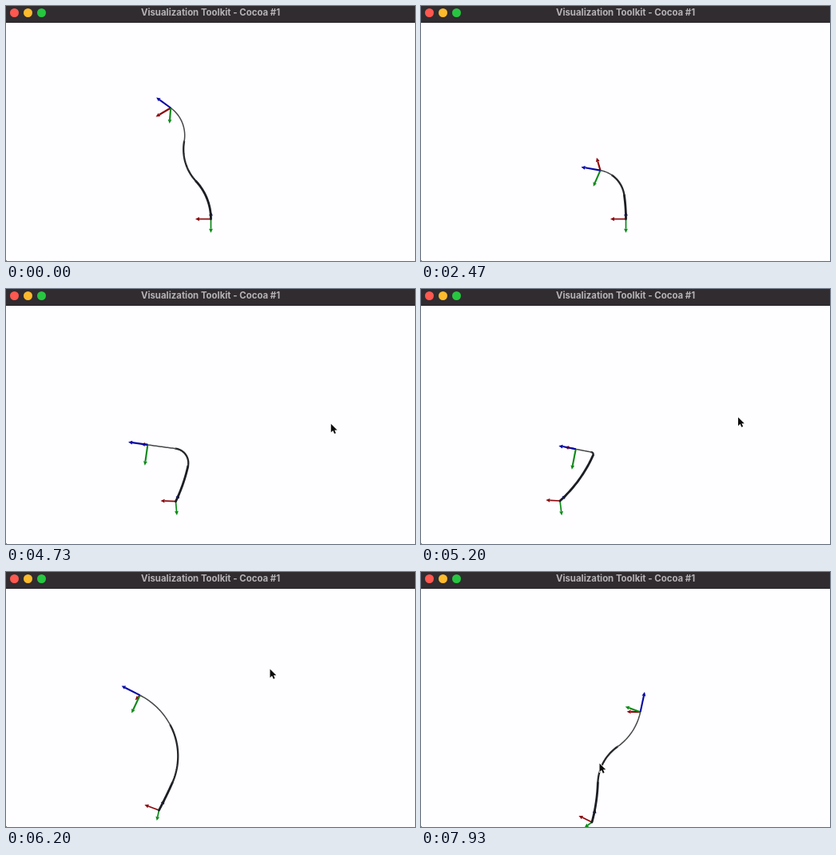
An HTML page with a canvas that plays this animation: 512x319 px, repeating every 8 s.

```html
<!DOCTYPE html>
<html lang="en">
<head>
<meta charset="utf-8">
<title>Arm viewer</title>
<style>
  html, body { margin: 0; width: 100%; height: 100%; overflow: hidden; background: #fefdff; }
  #stage { position: relative; width: 512px; height: 319px; overflow: hidden; }
  canvas { position: absolute; left: 0; top: 0; width: 512px; height: 319px; }
  header {
    position: absolute; left: 0; top: 0; width: 512px; height: 21px; box-sizing: border-box;
    background: #302c30; border-bottom: 1px solid #262326;
    font: 700 11.4px/17px Inter, "Liberation Sans", sans-serif;
    color: #b6b3b6; text-align: center; white-space: nowrap;
  }
  header i { position: absolute; top: 3px; width: 11px; height: 11px; border-radius: 50%; }
</style>
</head>
<body>
<div id="stage">
  <canvas id="view"></canvas>
  <header>
    <i style="left:5px;background:#fe5850"></i>
    <i style="left:22px;background:#fdba2d"></i>
    <i style="left:39px;background:#27c640"></i>
    Visualization Toolkit - Cocoa #1
  </header>
</div>
<script>
const LOOP = 8000, RATE = 15;
const RED = '#8b080c', GREEN = '#0b8a18', BLUE = '#0608a4';
const SECTIONS = [
  { width: 2.8, color: '#1b1e23' },
  { width: 2.3, color: '#24272a' },
  { width: 1.5, color: '#454748' }
];

const canvas = document.getElementById('view');
const ctx = canvas.getContext('2d');
const dpr = window.devicePixelRatio || 1;
canvas.width = 512 * dpr;
canvas.height = 319 * dpr;
ctx.scale(dpr, dpr);

// Each arm is three constant-curvature arcs (end heading, length), then the tip's tilt and roll.
// Angles are in degrees, clockwise from screen right.
const bent = [270, 19, 183, 59, 185, 53, 3, 179];
const swing = [275, 50, 335, 57, 287, 60, -6, 140];
const arms = [
  [0, [227, 52, 280, 54, 216, 47.5, 31, 130]],
  [11, [290, 44, 312, 72, 345, 88, 15, 150]],
  [24, [270, 36, 368, 6, 361, 28, 24, 174]],
  [35, [262, 30, 215, 30, 190, 16, 20, 215]],
  [45, [264, 50, 300, 75, 314, 60, 20, 140]],
  [54, bent],
  [63, bent],
  [78, [294, 71, 191, 5, 191, 20, 33, 180]],
  [93, [294, 38, 242, 75, 207, 54, 6, 162]],
  [101, [295, 42, 242, 91, 209, 55, 5, 155]],
  [107, swing],
  [111, swing],
  [119, [272, 50, 325, 53, 282, 53.5, -9, 140]]
];

// Base frame as the camera turns: x, y, heading, tilt, roll
const front = [256.5, 266.5, 270, 62, 90];
const low = [190.5, 313, 297, 35, 88];
const bases = [
  [0, front],
  [63, front],
  [78, [174, 265, 318, 57, 40]],
  [93, [191.5, 298, 298, 42, 79]],
  [101, low],
  [111, low],
  [119, [214, 313, 285, 29, 112]]
];

const pointer = [
  [0, [418, 178]], [63, [418, 178]], [78, [397, 160.5]], [93, [330.5, 121.5]],
  [101, [226.5, 237.5]], [111, [226.5, 237.5]], [119, [223.5, 239.5]]
];

// Values glide while the camera is dragged and jump otherwise.
const dragging = tick => tick >= 63 && tick < 101 || tick >= 111;

function sample(keys, tick) {
  let i = keys.length - 1;
  while (keys[i][0] > tick) i--;
  const [from, value] = keys[i], next = keys[i + 1];
  if (!next || !dragging(tick)) return value;
  const k = (tick - from) / (next[0] - from);
  return value.map((v, j) => v + (next[1][j] - v) * k);
}

const rad = deg => deg * Math.PI / 180;

function arrow(x, y, dx, dy, color, width) {
  const len = Math.hypot(dx, dy), head = Math.min(5, len * 0.6);
  ctx.save();
  ctx.translate(x, y);
  ctx.rotate(Math.atan2(dy, dx));
  ctx.strokeStyle = ctx.fillStyle = color;
  ctx.lineWidth = width;
  ctx.beginPath();
  ctx.moveTo(0, 0);
  ctx.lineTo(len - head, 0);
  ctx.stroke();
  ctx.beginPath();
  ctx.moveTo(len, 0);
  ctx.lineTo(len - head, -2.4);
  ctx.lineTo(len - head, 2.4);
  ctx.fill();
  ctx.restore();
}

// Projects three perpendicular axes; blue follows the heading.
function triad(x, y, heading, tilt, roll, size, width) {
  const h = rad(heading), t = rad(tilt), r = rad(roll);
  const axis = (along, across, color) => arrow(x, y,
    size * (along * Math.cos(h) - across * Math.sin(h)),
    size * (along * Math.sin(h) + across * Math.cos(h)), color, width);
  axis(-Math.sin(t) * Math.cos(r), -Math.sin(r), RED);
  axis(-Math.sin(t) * Math.sin(r), Math.cos(r), GREEN);
  axis(Math.cos(t), 0, BLUE);
}

function drawArm(arm, base) {
  const steps = 24;
  let [x, y, heading] = base;
  triad(...base, 19.5, 1.7);
  ctx.lineCap = ctx.lineJoin = 'round';
  SECTIONS.forEach(({ width, color }, s) => {
    const end = arm[2 * s], step = arm[2 * s + 1] / steps;
    ctx.lineWidth = width;
    ctx.strokeStyle = color;
    ctx.beginPath();
    ctx.moveTo(x, y);
    for (let i = 0; i < steps; i++) {
      const a = rad(heading + (end - heading) * (i + 0.5) / steps);
      x += step * Math.cos(a);
      y += step * Math.sin(a);
      ctx.lineTo(x, y);
    }
    ctx.stroke();
    heading = end;
  });
  ctx.lineCap = 'butt';
  triad(x, y, heading, arm[6], arm[7], 26, 2.1);
}

const cursor = new Path2D('M0 0V11.5L2.7 9L4.6 13.3L6.6 12.4L4.8 8.3H8.4Z');

function drawPointer([x, y]) {
  ctx.save();
  ctx.translate(x, y);
  ctx.scale(0.93, 0.93);
  ctx.lineJoin = 'round';
  ctx.strokeStyle = '#fff';
  ctx.lineWidth = 1.8;
  ctx.stroke(cursor);
  ctx.fillStyle = '#0c0c0c';
  ctx.fill(cursor);
  ctx.restore();
}

function render(ms) {
  const tick = Math.floor((ms + 4) * RATE / 1000);
  ctx.fillStyle = '#fefdff';
  ctx.fillRect(0, 0, 512, 319);
  ctx.fillStyle = '#777';
  ctx.fillRect(0, 318, 1, 1);
  drawArm(sample(arms, tick), sample(bases, tick));
  if (tick >= 64) drawPointer(sample(pointer, tick));
}

const start = performance.now();
function loop() {
  render((performance.now() - start) % LOOP);
  requestAnimationFrame(loop);
}
loop();
</script>
</body>
</html>
```
